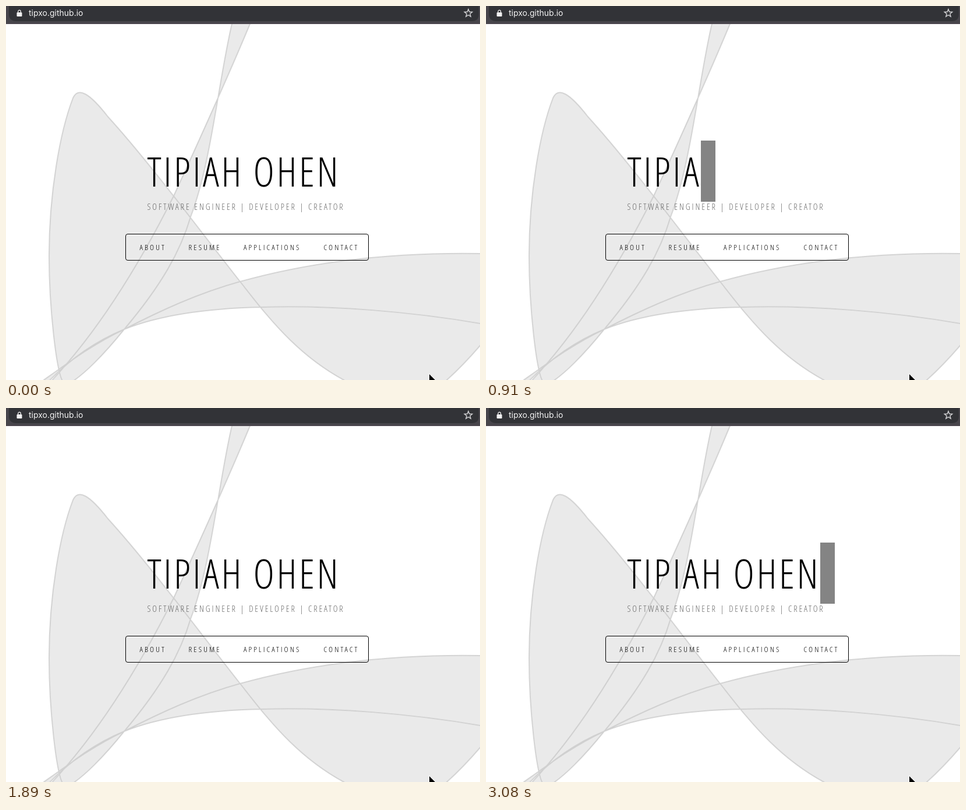
Recreate the animation shown at these times as an HTML page with a canvas. Size 814x642 px, loop 3290 ms.

```html
<!DOCTYPE html>
<html lang="en">
<head>
<meta charset="utf-8">
<title>Portfolio</title>
<style>
  html, body { margin: 0; width: 100%; height: 100%; overflow: hidden; background: #fff; }
  #stage { position: relative; width: 814px; height: 642px; overflow: hidden; --k: 1; }
  #stage > svg, #waves { position: absolute; left: 0; top: 0; }
  .cond {
    position: absolute; white-space: pre; color: #000;
    font-family: "Open Sans Condensed Light", "Open Sans Condensed", "Open Sans", sans-serif;
    font-weight: 300; font-stretch: 75%;
    letter-spacing: calc(var(--gap) / var(--k));
    transform: scaleX(var(--k)); transform-origin: 0 0;
  }
  #title { left: 242.5px; top: 231px; font-size: 70px; line-height: 105px; --gap: 3.5px; }
  #cursor { position: absolute; top: 231px; width: 25px; height: 105px; background: #848484; }
  #lower { position: absolute; left: 0; top: 0; }
  #role { left: 242.5px; top: 332.5px; font-size: 15px; line-height: 22px; --gap: 2.88px; color: #666; }
  #frame {
    position: absolute; left: 205px; top: 391px; width: 418px; height: 46px;
    box-sizing: border-box; border: 1px solid #000; border-radius: 4px;
  }
  .link { top: 404px; font-size: 13.6px; line-height: 20px; --gap: 3.1px; }
</style>
</head>
<body>
<div id="stage">
  <canvas id="waves" width="814" height="642"></canvas>

  <div id="title" class="cond"></div>
  <div id="cursor"></div>
  <div id="lower">
    <div id="role" class="cond">SOFTWARE ENGINEER | DEVELOPER | CREATOR</div>
    <div id="frame"></div>
    <div class="cond link" style="left:229.5px">ABOUT</div>
    <div class="cond link" style="left:313.5px">RESUME</div>
    <div class="cond link" style="left:408px">APPLICATIONS</div>
    <div class="cond link" style="left:545.5px">CONTACT</div>
  </div>

  <svg width="814" height="642">
    <rect width="814" height="31" fill="#47454b"/>
    <path d="M5 0H812V14Q812 26 800 26H18Q5 26 5 14Z" fill="#323337"/>
    <rect y="29.5" width="814" height="1.5" fill="#4d464f"/>
    <rect x="18.5" y="11" width="9" height="7" rx="1" fill="#f1f1f1"/>
    <path d="M20.7 11.5V9.5a2.3 2.3 0 0 1 4.6 0V11.5" fill="none" stroke="#f1f1f1" stroke-width="1.3"/>
    <text x="39" y="17" font-family="Inter, sans-serif" font-size="14" fill="#f5f5f5">tipxo.github.io</text>
    <path id="star" fill="none" stroke="#d4d4d6" stroke-width="1.4"/>
    <path d="M727 632V648L731 644.5L738 643Z" stroke="#fff" stroke-width="1.5" paint-order="stroke"/>
  </svg>
</div>

<script>
const $ = id => document.getElementById(id);

// Each curve runs off the stage, so it can be closed into the area on one side of it
const rise = "M100 648C86 636 74 510 74 430C74 320 93 215 115 158";
const fall = "C124 138 144 150 175 190C245 267 325 375 402 473C447 530 503 607 600 652";
const straight = "M421 26C397 84 338 217 288 326C232 438 158 560 72 650";
const bend = "M389 26C365 126 353 268 317 362C300 420 268 478 203 555C170 596 132 636 105 650";
const upper = "M58 647C110 610 150 580 203 555C265 523 330 493 402 473C520 440 660 422 820 425";
const under = "M68 650C105 610 150 577 203 555C268 529 350 519 437 517C560 513 700 525 820 546";
const corner = "M748 650Q785 618 820 576";

const rightOf = curve => curve + "H820V26Z";
const below = curve => curve + "V650Z";

function drawWaves() {
  const ctx = $("waves").getContext("2d");
  const fill = (color, path, clip) => {
    ctx.save();
    if (clip) ctx.clip(new Path2D(clip));
    ctx.fillStyle = color;
    ctx.fill(new Path2D(path), "evenodd");
    ctx.restore();
  };
  const gray = "#eaeaea", white = "#fff";
  fill(gray, rise + fall + "Z");
  fill(white, below(under), rightOf(bend));
  fill(gray, below(upper) + below(under));
  fill(gray, rightOf(bend) + rightOf(straight));
  fill(gray, below(under), rightOf("M115 158" + fall));
  fill(white, below(corner));
  ctx.strokeStyle = "rgba(196,196,196,.65)";
  ctx.lineWidth = 2;
  ctx.stroke(new Path2D(rise + fall + straight + bend + upper + under + corner));
}
drawWaves();

const starPoint = (_, i) => {
  const a = i * Math.PI / 5, r = i % 2 ? 3 : 7;
  return `${794 + r * Math.sin(a)} ${12.5 - r * Math.cos(a)}`;
};
$("star").setAttribute("d", "M" + Array.from({ length: 10 }, starPoint).join("L") + "Z");

// Condense the regular face only where no condensed one is installed
const title = $("title");
title.textContent = "N".repeat(10);
if ((title.offsetWidth - 35) / 700 > .62) $("stage").style.setProperty("--k", .72);

const NAME = "TIPIAH OHEN";
const LOOP = 3290, TICK = 70;
const ERASE = 350, TYPE_FROM = 469, TYPE_EVERY = 123.5;
const BLINK_FROM = 720, BLINK_EVERY = 397;

// Number of regular events so far, the first one included
const events = (t, from, every) => Math.max(0, Math.floor((t - from) / every) + 1);

let shown = -1;
function draw(now) {
  const t = Math.max(0, now - start) % LOOP;
  const tickEnd = (Math.floor(t / TICK) + 1) * TICK - 1;
  const count = t < ERASE ? NAME.length : Math.min(NAME.length, events(tickEnd, TYPE_FROM, TYPE_EVERY));
  if (count !== shown) {
    shown = count;
    title.textContent = NAME.slice(0, count);
    $("lower").style.top = count ? "0" : "-105px";
    $("cursor").style.left = Math.round(title.getBoundingClientRect().right) + "px";
  }
  $("cursor").style.visibility = events(tickEnd, BLINK_FROM, BLINK_EVERY) % 2 ? "visible" : "hidden";
  requestAnimationFrame(draw);
}
const start = performance.now();
draw(start);
</script>
</body>
</html>
```
